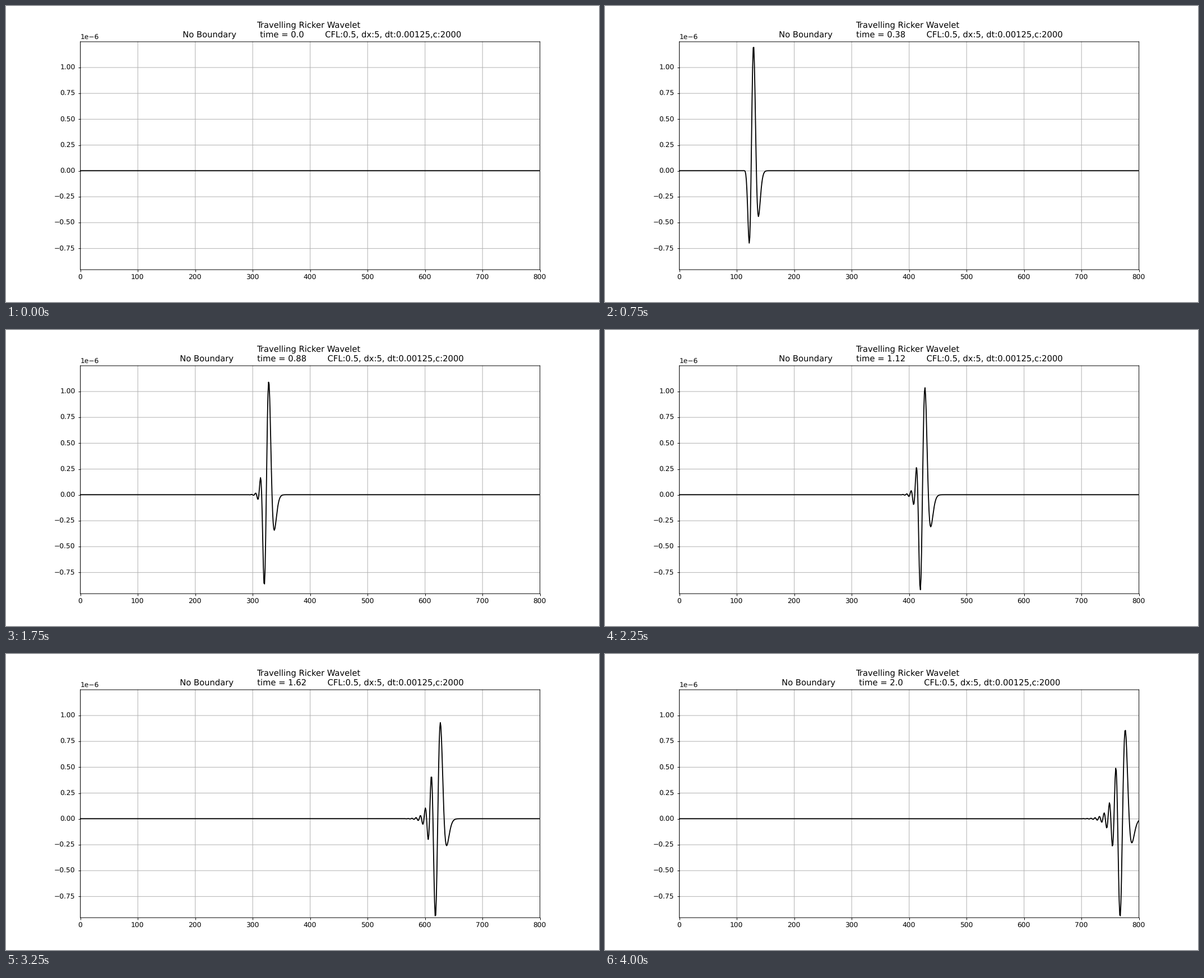
Write a matplotlib script that moves like this. It is 1058 px wide and 529 px high and loops after 4250 ms.

```python
import numpy as np
import matplotlib.pyplot as plt
from matplotlib.animation import FuncAnimation
from matplotlib.transforms import ScaledTranslation

C, DX, DT = 2000, 5, 0.00125
CFL = C * DT / DX
FREQ, DELAY = 20, 0.05
NODES, SPAN = 1000, 800
FRAMES, STRIDE, INTERVAL = 17, 100, 250


def ricker(t):
    a = (np.pi * FREQ * (t - DELAY)) ** 2
    return (1 - 2 * a) * np.exp(-a)


def simulate():
    """Second-order wave equation, driven beside a fixed left end."""
    old, now = np.zeros(NODES), np.zeros(NODES)
    shots = []
    for n in range((FRAMES - 1) * STRIDE + 1):
        new = np.zeros(NODES)
        bend = now[2:] - 2 * now[1:-1] + now[:-2]
        new[1:-1] = 2 * now[1:-1] - old[1:-1] + CFL ** 2 * bend
        new[1] += DT ** 2 / DX * ricker(n * DT)
        old, now = now, new
        if n % STRIDE == 0:
            shots.append(now[:SPAN + 1].copy())
    return shots


def heading(i):
    t = round(i * STRIDE * DT, 2)
    gap = " " * 9
    return (f"Travelling Ricker Wavelet \n{gap}No Boundary{gap}time = {t}"
            f"        CFL:{CFL}, dx:{DX}, dt:{DT},c:{C}")


def nudge_frame(ax):
    """Soft grid, ticks and spines, half a pixel right and down."""
    shift = ScaledTranslation(0.005, -0.005, ax.figure.dpi_scale_trans)
    for part in (*ax.get_xgridlines(), *ax.get_ygridlines(),
                 *ax.get_xticklines(), *ax.get_yticklines()):
        part.set_transform(part.get_transform() + shift)
    for spine in ax.spines.values():
        spine.set_transform(spine.get_spine_transform() + shift)


plt.rcParams.update({"font.family": "DejaVu Sans", "text.hinting": "none",
                     "path.snap": False})
shots = simulate()

fig, ax = plt.subplots(figsize=(12, 6), dpi=529 / 6)
line, = ax.plot(np.arange(SPAN + 1), shots[0], color="black", lw=1.5)
ax.set_xlim(0, SPAN)
ax.set_ylim(-0.955e-6, 1.249e-6)
ax.grid(True)
nudge_frame(ax)
title = ax.set_title(heading(0), linespacing=1.28)


def update(i):
    line.set_ydata(shots[i])
    title.set_text(heading(i))
    return line, title


anim = FuncAnimation(fig, update, frames=FRAMES, interval=INTERVAL,
                     repeat=True, repeat_delay=0, blit=False)
plt.show()
```
